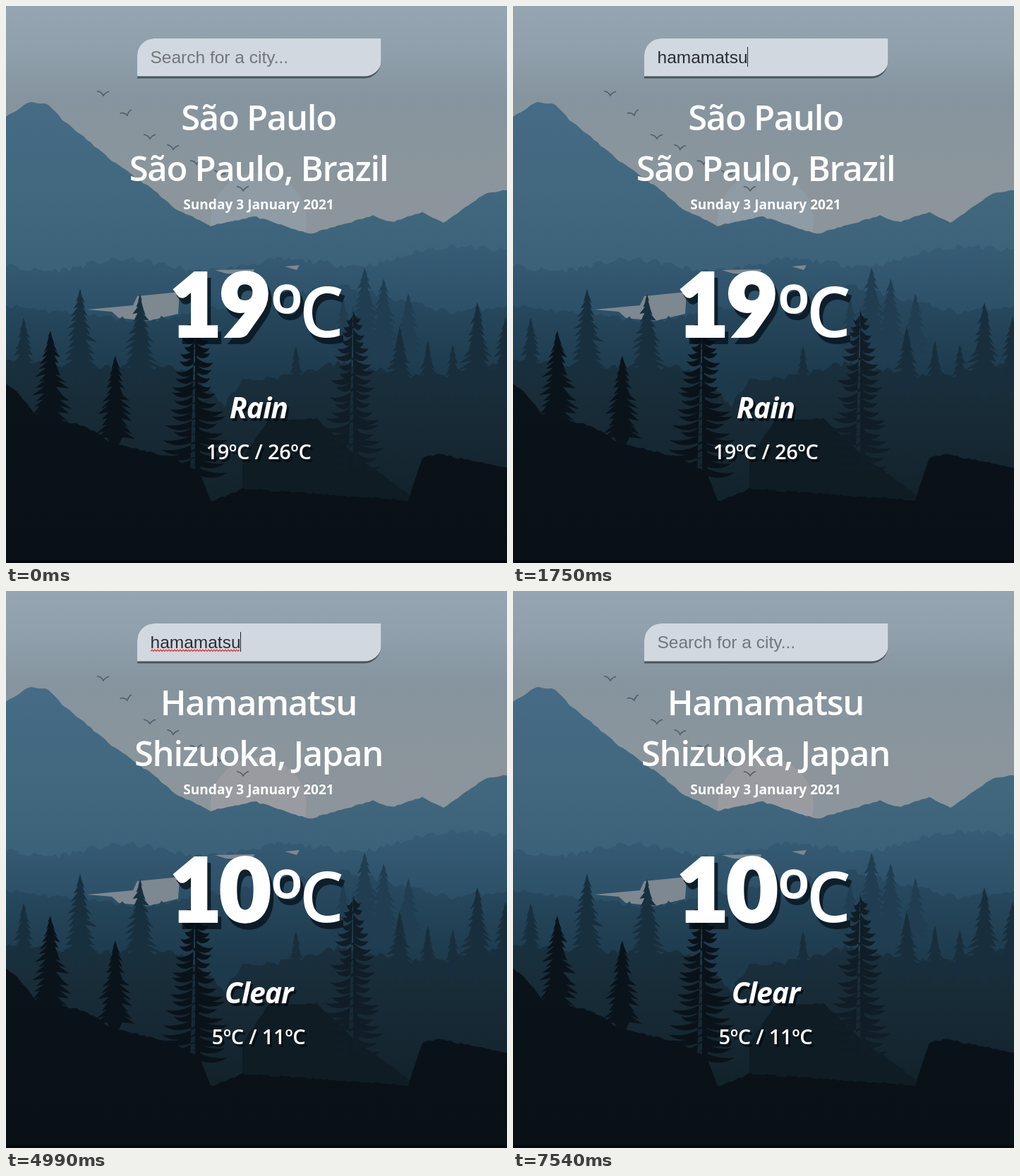
Write an HTML page that moves like this. It is 710 px wide and 789 px high and loops after 8 s.

```html
<!DOCTYPE html>
<html lang="en">
<head>
<meta charset="utf-8">
<title>Weather search</title>
<style>
html, body { margin: 0; width: 100%; height: 100%; overflow: hidden; background: #0a1117; }
svg { display: block; width: 710px; height: 789px; }
text { white-space: pre; }
.ui { font-family: "Open Sans", "Noto Sans", sans-serif; fill: #fff; text-anchor: middle; }
.place { font-size: 49px; font-weight: 600; letter-spacing: -1.3px; }
.date { font-size: 19.1px; font-weight: 700; }
.deg { font-family: Lato, "Open Sans", sans-serif; font-size: 124px; font-weight: 900; letter-spacing: -2px; text-anchor: start; stroke: #fff; stroke-width: 4px; }
.unit { font-weight: 600; text-anchor: start; }
.sky { font-size: 41px; font-weight: 700; font-style: italic; letter-spacing: -1px; }
.range { font-size: 29px; font-weight: 600; letter-spacing: -.2px; }
.big { filter: drop-shadow(5px 9px 0 rgba(6, 16, 24, .75)); }
.small { filter: drop-shadow(3px 4px 0 rgba(4, 10, 15, .75)); }
.input { font: 24.5px "Liberation Sans", Arial, sans-serif; }
</style>
</head>
<body>
<svg id="stage" viewBox="0 0 710 789" xmlns="http://www.w3.org/2000/svg"></svg>
<script>
const LOOP = 8000;
const WORD = 'hamamatsu';
const TEXT_X = 204.5;
const BLINK = 526;

let seed = 11;
const rnd = () => (seed = (seed * 16807) % 2147483647) / 2147483647;
const range = n => [...Array(n).keys()];
const poly = (pts, fill) =>
  `<path d="M${pts.map(p => p.map(v => v.toFixed(1))).join('L')}Z" fill="${fill}"/>`;

function gradient(id, y1, y2, ...stops) {
  const list = stops.map((c, i) =>
    `<stop offset="${i / (stops.length - 1)}" stop-color="${c}"/>`).join('');
  return `<linearGradient id="${id}" gradientUnits="userSpaceOnUse" x1="0" x2="0" y1="${y1}" y2="${y2}">${list}</linearGradient>`;
}

// Straight runs between a few key points.
const through = (...keys) => x => {
  const i = Math.max(1, keys.findIndex(k => k[0] >= x));
  const [[x1, y1], [x2, y2]] = [keys[i - 1], keys[i]];
  return y1 + (y2 - y1) * (x - x1) / (x2 - x1);
};

// A hill with a roughened top edge, filled down to the bottom.
function ridge(height, fill, jag, x1 = 0, x2 = 710) {
  const n = Math.round((x2 - x1) / 5);
  const top = range(n + 1).map(i => {
    const x = x1 + (x2 - x1) * i / n;
    return [x, height(x) - jag * (rnd() - .5)];
  });
  return poly([[x1, 789], ...top, [x2, 789]], fill);
}

// A conifer with ragged, hanging tiers.
function conifer(x, top, base, fill) {
  const tall = base - top, n = Math.round(tall / 9);
  const side = dir => range(n).flatMap(i => {
    const f = (i + 1) / n, w = dir * tall * .27 * f ** .8;
    return [[x + w * (.65 + .45 * rnd()), top + tall * f + 4 * rnd()],
            [x + w * (.3 + .2 * rnd()), top + tall * f - 1]];
  });
  return poly([[x, top], ...side(1), [x, base + 20], ...side(-1).reverse()], fill);
}

// A tall bare pine: thin trunk and drooping boughs that turn up at the tip.
function pine(x, top, base, half, fill) {
  let d = `M${x} ${top}L${x + 8} ${base}H${x - 7}Z`;
  const n = Math.round((base - top) / 11);
  for (let i = 1; i < n; i++) {
    for (const dir of [-1, 1]) {
      const y = top + (base - top) * i / n + 5 * rnd();
      const len = dir * half * Math.min(1, .25 + 1.1 * i / n) * (.65 + .4 * rnd());
      d += `M${x} ${y - 5}Q${x + len / 2} ${y + 8} ${x + len} ${y + 4}Q${x + len * .6} ${y + 18} ${x} ${y + 6}Z`;
    }
  }
  return `<path d="${d}" fill="${fill}"/>`;
}

const row = (base, fill, ...tips) => tips.map(([x, top]) => conifer(x, top, base, fill)).join('');

// Birds drifting down to the right.
const flock = () => range(7).map(i => {
  const x = 138 + 33 * i, y = 124 + 22 * i + 20 * rnd();
  return `<path transform="translate(${x} ${y}) rotate(${50 * rnd() - 20})" d="M-9 -3Q-3 -3 0 3Q3 -2 8 -3" fill="none" stroke="#4d5c68" stroke-width="1.5"/>`;
}).join('');

function landscape() {
  const far = through([0, 157], [33, 136], [60, 139], [80, 161], [118, 192], [150, 219], [211, 262],
    [240, 288], [290, 311], [352, 298], [430, 323], [520, 297], [548, 306], [590, 292], [620, 307],
    [680, 265], [710, 261]);
  const mid = x => 367 + 8 * Math.sin(x / 36) - Math.max(0, x - 420) * .09;
  const low = through([0, 425], [200, 447], [245, 437], [475, 396], [630, 434], [710, 424]);
  const wood = through([0, 500], [130, 512], [250, 512], [310, 565], [335, 530], [400, 524],
    [470, 506], [600, 528], [710, 502]);
  const rock = through([335, 640], [372, 586], [440, 584], [500, 640], [575, 695]);
  const ground = through([0, 535], [14, 545], [45, 582], [110, 594], [150, 618], [240, 641],
    [275, 662], [291, 702], [335, 684], [570, 700], [590, 641], [612, 634], [710, 655]);
  return '<defs>' +
    gradient('air', 0, 330, '#95a5b2', '#8f9fab', '#85949e', '#89959d', '#8b959b', '#8b959b') +
    gradient('far', 135, 400, '#456b86', '#42687f', '#396078') +
    gradient('mid', 345, 450, '#365b74', '#2a4e65') +
    gradient('low', 400, 530, '#294b62', '#1d3a4c') +
    gradient('wood', 490, 690, '#1b313f', '#13232c') +
    gradient('ground', 540, 789, '#0a131a', '#091016') +
    '</defs>' +
    '<rect width="710" height="789" fill="url(#air)"/>' +
    '<circle id="sun" cx="358" cy="304" r="68"/>' +
    flock() +
    ridge(far, 'url(#far)', 2) +
    ridge(mid, 'url(#mid)', 9) +
    '<path d="M115 430L180 424 186 411 246 405 244 436 202 446 160 442 150 433ZM296 374L352 373 350 380 312 379ZM395 369L416 367 412 374Z" fill="#7d8890"/>' +
    ridge(low, 'url(#low)', 9) +
    row(492, '#203d51', [508, 371], [535, 386], [570, 407], [478, 414]) +
    ridge(wood, 'url(#wood)', 10) +
    row(520, '#182f3e', [25, 442], [105, 400], [190, 408]) +
    row(540, '#192e3c', [411, 482], [558, 454], [598, 474], [633, 480], [668, 420], [708, 440]) +
    ridge(rock, '#0f1c24', 3, 335, 575) +
    pine(492, 425, 655, 44, '#101d26') +
    pine(268, 432, 665, 46, '#0a1219') +
    row(612, '#0a131a', [63, 460], [155, 495]) +
    ridge(ground, 'url(#ground)', 3) +
    '<rect y="785" width="710" height="4" fill="#05080c"/>';
}

function panel() {
  const wave = range(64).map(i => `${205 + 2 * i} ${i % 2 ? 83.2 : 85.4}`).join('L');
  const box = (bottom, ry, fill) =>
    `<path d="M186 ${bottom}V70A24 24 0 0 1 210 46H531.5V78.5A24 ${ry} 0 0 1 507.5 ${bottom}Z" fill="${fill}"/>`;
  return box(102.5, 24, '#4b545b') + box(99.5, 21, '#d1d8df') +
    `<text id="hint" class="input" x="${TEXT_X}" y="81" fill="#737679">Search for a city...</text>` +
    `<text id="typed" class="input" x="${TEXT_X}" y="81" fill="#2b2f33"></text>` +
    `<path id="wavy" d="M${wave}" fill="none" stroke="#ee2a2e" stroke-width="1.2"/>` +
    '<rect id="caret" y="58" width="1" height="28" fill="#20252a"/>' +
    '<text id="city" class="ui place" x="358" y="175.5"></text>' +
    '<text id="region" class="ui place" x="358" y="247.5"></text>' +
    '<text class="ui date" x="358" y="288">Sunday 3 January 2021</text>' +
    '<g class="big"><text id="deg" class="ui deg" x="233" y="467.5"></text>' +
    '<text class="ui unit" x="375" y="481" font-size="120">º</text>' +
    '<text class="ui unit" x="416" y="469" font-size="99">C</text></g>' +
    '<g class="small"><text id="cond" class="ui sky" x="358" y="584"></text>' +
    '<text id="range" class="ui range" x="358" y="642"></text></g>';
}

const stage = document.getElementById('stage');
stage.innerHTML = landscape() + panel();
const el = {};
stage.querySelectorAll('[id]').forEach(n => el[n.id] = n);

const reports = [
  { sun: '#8f9ba5', city: 'São Paulo', region: 'São Paulo, Brazil', deg: '19', cond: 'Rain', range: '19ºC / 26ºC' },
  { sun: '#9a9ba1', city: 'Hamamatsu', region: 'Shizuoka, Japan', deg: '10', cond: 'Clear', range: '5ºC / 11ºC' }
];

// Steady typing, a hesitant ending, then backspace held down.
function letters(t) {
  if (t < 1370) return Math.min(6, Math.max(0, Math.floor((t - 370) / 90)));
  if (t < 1750) return 7;
  if (t < 5770) return 9;
  if (t < 6240) return 8;
  return Math.max(0, Math.round(7 - Math.floor((t - 6240) / 90) * 7 / 3));
}

const caretOn = t => t < 1750 ? t >= 280 : Math.floor((t - 1750) / BLINK) % 2 === 0;
const show = (node, on) => node.setAttribute('visibility', on ? 'visible' : 'hidden');

function render(t) {
  const count = letters(t);
  el.typed.textContent = WORD.slice(0, count);
  const width = count ? el.typed.getComputedTextLength() : 0;
  el.caret.setAttribute('x', Math.floor(TEXT_X + width + .15));
  show(el.caret, caretOn(t));
  show(el.hint, !count);
  show(el.wavy, t >= 2820 && t < 5770);

  const report = reports[t < 3190 ? 0 : 1];
  for (const key of ['city', 'region', 'deg', 'cond', 'range']) el[key].textContent = report[key];
  el.sun.setAttribute('fill', report.sun);
}

const start = performance.now();
function tick() {
  render((performance.now() - start) % LOOP);
  requestAnimationFrame(tick);
}
tick();
</script>
</body>
</html>
```
